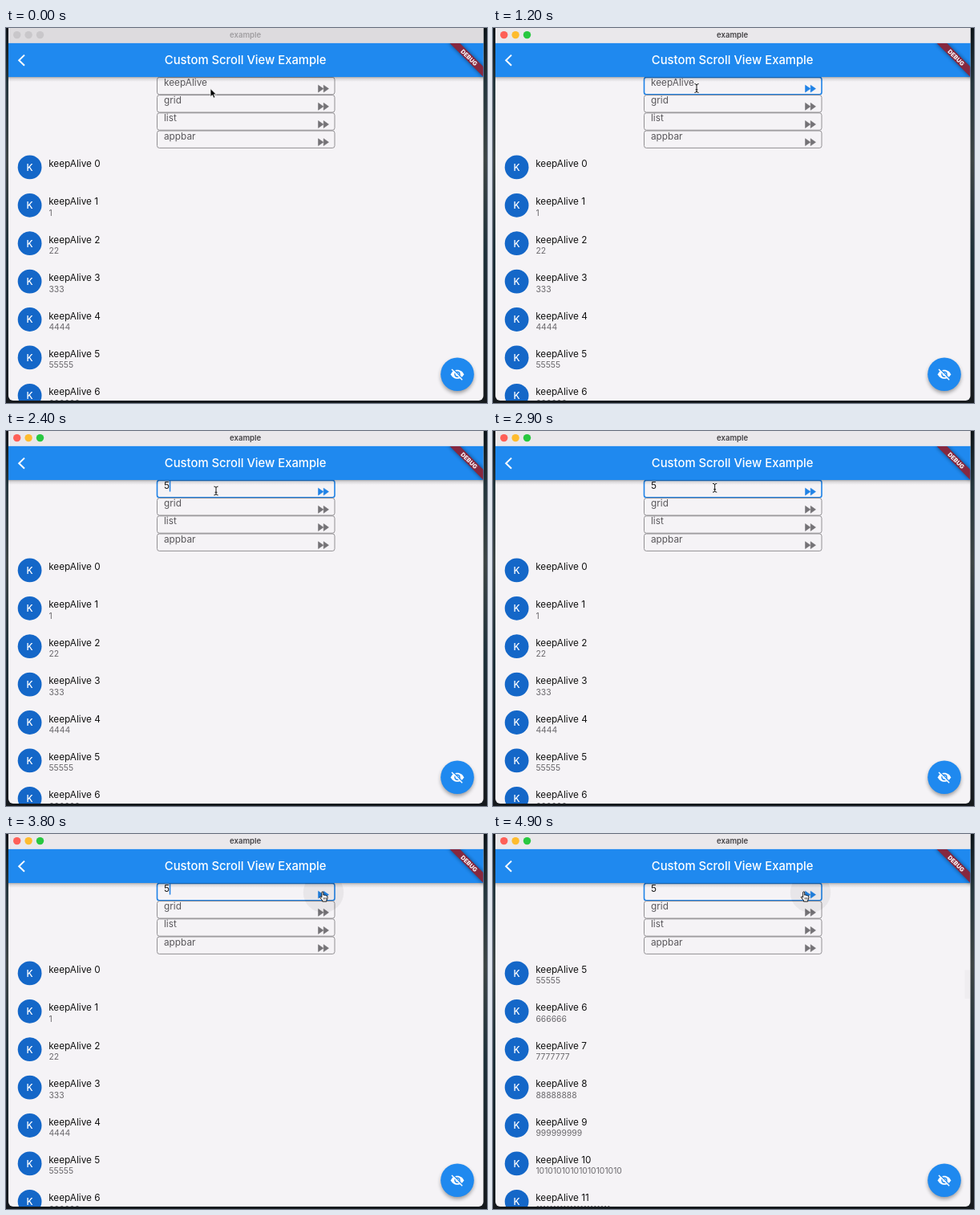
Animation, 600 px wide and 467 px high, one loop 5000 ms. Source, as an HTML page:

```html
<!DOCTYPE html>
<html lang="en">
<head>
<meta charset="utf-8">
<title>example</title>
<style>
html, body { margin: 0; width: 100%; height: 100%; overflow: hidden; background: #10181d; }
svg { display: block; width: 600px; height: 467px; font-family: Inter, Roboto, sans-serif; }
text { white-space: pre; }
</style>
</head>
<body>
<svg id="stage" viewBox="0 0 600 467" xmlns="http://www.w3.org/2000/svg">
  <defs>
    <linearGradient id="wall" x2="0" y2="1">
      <stop offset="0" stop-color="#0c1419"/>
      <stop offset=".15" stop-color="#24363d"/>
      <stop offset=".35" stop-color="#3c4444"/>
      <stop offset=".6" stop-color="#1d3039"/>
      <stop offset="1" stop-color="#15191d"/>
    </linearGradient>
    <linearGradient id="barShade" x2="0" y2="1">
      <stop offset="0" stop-color="#000" stop-opacity=".3"/>
      <stop offset=".35" stop-color="#000" stop-opacity=".12"/>
      <stop offset="1" stop-color="#000" stop-opacity="0"/>
    </linearGradient>
    <filter id="soft" x="-50%" y="-50%" width="200%" height="200%"><feGaussianBlur stdDeviation="2.4"/></filter>
    <clipPath id="winClip"><rect x="3" y="-10" width="592.5" height="474" rx="6"/></clipPath>
    <clipPath id="listClip"><rect x="3" y="150" width="593" height="315"/></clipPath>
    <clipPath id="bodyClip"><rect x="3" y="61" width="593" height="404"/></clipPath>
    <clipPath id="appClip"><rect x="3" y="19" width="592.5" height="446"/></clipPath>
  </defs>

  <rect width="600" height="467" fill="url(#wall)"/>
  <g clip-path="url(#winClip)">
    <rect x="3" width="593" height="465" fill="#f5f3f6"/>

    <g clip-path="url(#listClip)"><g id="list"></g></g>
    <rect id="thumb" x="588.5" width="6.5" height="35.5" fill="#000"/>

    <g clip-path="url(#bodyClip)">
      <g id="fields" fill="none"></g>
      <circle id="hover" cx="396" cy="72.8" r="25.2" fill="#000" fill-opacity=".055"/>
      <rect id="caret" y="62" width="1.5" height="13.5" fill="#1f82e6"/>
    </g>

    <rect x="3" y="61" width="593" height="6" fill="url(#barShade)"/>
    <rect x="3" y="18.5" width="593" height="42.5" fill="#1f89ef"/>
    <path d="M23 33.6L16.2 40.2L23 46.8" fill="none" stroke="#fff" stroke-width="2"/>
    <text x="298.7" y="45.4" font-size="14.8" font-weight="500" fill="#fff" text-anchor="middle">Custom Scroll View Example</text>

    <g clip-path="url(#appClip)">
      <g transform="translate(595.5 19) rotate(45)">
        <rect x="-30" y="20.7" width="60" height="8.9" fill="#000" opacity=".5" filter="url(#soft)"/>
        <rect x="-30" y="20.7" width="60" height="8.9" fill="#86283f"/>
        <text y="27.8" font-size="7.3" font-weight="800" fill="#fff" text-anchor="middle">DEBUG</text>
      </g>
    </g>

    <rect id="titleBar" x="3" width="593" height="18.7"/>
    <g id="lights"></g>
    <text id="winTitle" x="298.6" y="12" font-size="9.6" font-weight="600" text-anchor="middle">example</text>

    <circle cx="563" cy="434" r="20.5" fill="#000" opacity=".38" filter="url(#soft)"/>
    <circle cx="563" cy="431.2" r="20.8" fill="#1f89ef"/>
    <g transform="translate(554.1 422.3) scale(.74)">
      <path d="M1 12C2.7 7.6 7 4.5 12 4.5S21.3 7.6 23 12C21.3 16.4 17 19.5 12 19.5S2.7 16.4 1 12Z" fill="#fff"/>
      <circle cx="12" cy="12" r="5" fill="#1f89ef"/>
      <circle cx="12" cy="12" r="3" fill="#fff"/>
      <path d="M3.9 2.4L22 20.5" stroke="#1f89ef" stroke-width="1.9"/>
      <path d="M2.6 3.6L20.4 21.4" stroke="#fff" stroke-width="1.9"/>
    </g>
  </g>

  <path id="arrow" d="M0 0V10.2L2.4 8L4 11.7L5.9 10.9L4.3 7.3H7.4Z" fill="#000" stroke="#fff" stroke-width=".8"/>
  <g id="beam" fill="none">
    <path d="M-2.6 -5.4Q0 -5.4 0 -3.8Q0 -5.4 2.6 -5.4M0 -4V4M-2.6 5.4Q0 5.4 0 3.8Q0 5.4 2.6 5.4M-1.4 1.8H1.4" stroke="#fff" stroke-width="2" opacity=".75"/>
    <path d="M-2.6 -5.4Q0 -5.4 0 -3.8Q0 -5.4 2.6 -5.4M0 -4V4M-2.6 5.4Q0 5.4 0 3.8Q0 5.4 2.6 5.4M-1.4 1.8H1.4" stroke="#111" stroke-width="1"/>
  </g>
  <g id="hand" stroke="#000" stroke-width=".9" stroke-linejoin="round">
    <path d="M-2.6 1V-5Q-2.6 -6.2 -1.6 -6.2T-.6 -5V-1.8Q.3 -2.8 1.2 -1.6Q2.2 -2.3 2.9 -1.1Q4.6 -1.6 4.6 .6Q4.6 3.2 3.4 4.4V6H-1.8V4.8Q-3.2 3.4 -5 .6Q-4.6 -1 -2.6 1Z" fill="#fff"/>
    <path d="M-.3 1V3.6M1.3 1V3.6M2.8 1V3.6" fill="none" stroke-width=".6"/>
  </g>
</svg>
<script>
const LOOP = 5000, STEP = 100, SCALE = 0.74, ROW = 47.4;
const FOCUS = 300, TYPED = 2400, PRESS = 3800, SETTLED = 4100, BLINK = 500;
const BLUE = "#1f82e6", GREY = "#747276";
const $ = id => document.getElementById(id);

function add(parent, tag, attrs, text) {
  const el = document.createElementNS("http://www.w3.org/2000/svg", tag);
  set(el, attrs);
  if (text !== undefined) el.textContent = text;
  parent.appendChild(el);
  return el;
}
function set(el, attrs) {
  for (const k in attrs) el.setAttribute(k, attrs[k]);
}
const show = (el, on) => set(el, { visibility: on ? "visible" : "hidden" });

// List rows
for (let i = 0; i < 13; i++) {
  const row = add($("list"), "g", { transform: `translate(0 ${173.4 + i * ROW})` });
  add(row, "circle", { cx: 29.6, r: 14.9, fill: "#1467c8" });
  add(row, "text", { x: 29.6, y: 4.3, "font-size": 11.8, "font-weight": 500, fill: "#fff", "text-anchor": "middle" }, "K");
  add(row, "text", { x: 53.2, y: -0.5, "font-size": 11.75, fill: "#111" }, "keepAlive " + i);
  add(row, "text", { x: 53.4, y: 13, "font-size": 10.36, fill: "#6b696d" }, String(i).repeat(i));
}

// Input fields
const fields = ["keepAlive", "grid", "list", "appbar"].map((name, i) => {
  const g = add($("fields"), "g", { transform: `translate(0 ${i * 22.2})` });
  const box = add(g, "rect", { x: 188.5, y: 61.4, width: 221.5, height: 21.4, rx: 2.8 });
  const label = add(g, "text", { x: 197, y: 72, "font-size": 11.8 }, name);
  const icon = add(g, "path", {
    d: "M4 18L12.5 12L4 6ZM13 6V18L21.5 12Z", "stroke-width": 0.8, "stroke-linejoin": "round",
    transform: `translate(386.6 66.7) scale(${SCALE})`
  });
  return { box, label, icon };
});

const lights = ["#fe5f57", "#febc2e", "#28c840"].map((color, i) => ({
  color, el: add($("lights"), "circle", { cx: 13.7 + i * 14.4, cy: 8.6, r: 4.7 })
}));

// Pointer path: time, x, y
const path = [
  [0, 255, 75.5], [300, 254.6, 75.5], [500, 254.6, 75.5], [1200, 254, 75],
  [1900, 254, 75], [2200, 262, 74.5], [2700, 262, 74.5], [3000, 284, 69],
  [3300, 321.3, 63], [3600, 385, 74], [3700, 396.5, 78], [4500, 396.5, 78], [4900, 389.3, 78]
];
function pointer(t) {
  const n = path.findIndex(p => p[0] > t);
  if (n < 0) return path[path.length - 1].slice(1);
  const a = path[n - 1], b = path[n], k = (t - a[0]) / (b[0] - a[0]);
  return [a[1] + (b[1] - a[1]) * k, a[2] + (b[2] - a[2]) * k];
}

const clamp = v => Math.min(1, Math.max(0, v));
const ease = v => v * v * (3 - 2 * v);

function draw(t) {
  const focused = t >= FOCUS, typed = t >= TYPED;

  set($("titleBar"), { fill: focused ? "#eae8eb" : "#dddbde" });
  set($("winTitle"), { fill: focused ? "#454346" : "#a09ea1" });
  lights.forEach(l => set(l.el, { fill: focused ? l.color : "#c9c7ca" }));

  fields.forEach((f, i) => {
    const on = focused && i === 0;
    set(f.box, { stroke: on ? BLUE : "#88868a", "stroke-width": on ? 1.6 : 0.9 });
    set(f.icon, { fill: on ? BLUE : GREY, stroke: on ? BLUE : GREY });
    set(f.label, { fill: i === 0 && typed ? "#151515" : "#59575b" });
  });
  fields[0].label.textContent = typed ? "5" : "keepAlive";

  const since = t - (typed ? TYPED : FOCUS);
  show($("caret"), focused && Math.floor(since / BLINK) % 2 === 0);
  set($("caret"), { x: typed ? 203.8 : 196.3 });

  const k = ease(clamp((t - PRESS) / (SETTLED - PRESS)));
  set($("list"), { transform: `translate(0 ${-5 * ROW * k})` });
  const seen = clamp((t - PRESS) / 200) * (1 - clamp((t - SETTLED - 600) / 260));
  set($("thumb"), { y: 150 + 19.5 * k, "fill-opacity": 0.11 * seen });

  const [x, y] = pointer(t);
  const over = x > 380;
  show($("hover"), over);
  show($("arrow"), !focused);
  show($("beam"), focused && !over);
  show($("hand"), over);
  for (const id of ["arrow", "beam", "hand"]) set($(id), { transform: `translate(${x} ${y})` });
}

const start = performance.now();
function tick() {
  const t = (performance.now() - start) % LOOP;
  draw(Math.floor(t / STEP) * STEP);
  requestAnimationFrame(tick);
}
tick();
</script>
</body>
</html>
```
